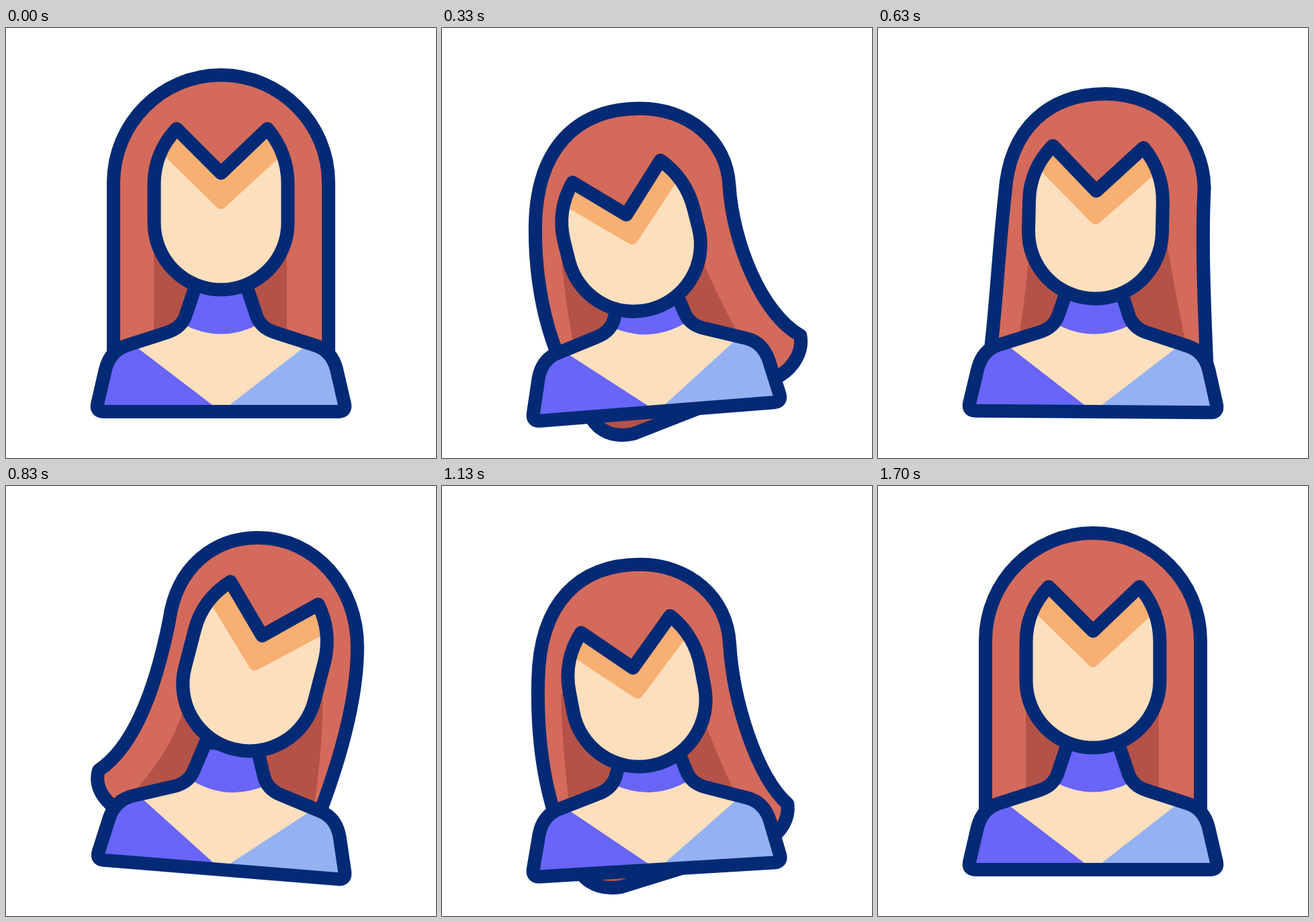
These frames come from a looping animation (640x640 px, 2 s). An HTML page with a canvas:

```html
<!DOCTYPE html>
<html lang="en">
<head>
<meta charset="utf-8">
<title>Portrait</title>
<style>
  html, body { margin: 0; height: 100%; overflow: hidden; background: #fff; }
  canvas { display: block; }
</style>
</head>
<body>
<canvas id="stage" width="640" height="640"></canvas>
<script>
const c = document.getElementById('stage').getContext('2d');
const NAVY = '#042a75', HAIR = '#d46a5b', SHADE = '#b55247', SKIN = '#fcdfbd',
      FRINGE = '#f7af72', VIOLET = '#6865f8', BLUE = '#94b1f2';

// Hair outline: left side, dome, right side, bottom; the last six points bound the shaded back
const points = s => s.split(' ').map(p => p.split(',').map(Number));
const hairRest = points(
  '160,490 160,410 160,320 160,230 160,142 232,70 320,70 408,70 480,142 480,230 ' +
  '480,320 480,410 480,490 480,530 460,555 430,555 210,555 180,555 160,530 ' +
  '220,300 220,420 220,560 418,560 418,420 418,300');
const hairLeft = points(
  '220,566 165,508 137,407 137,306 137,183 197,124 293,124 361,124 419,167 423,235 ' +
  '429,320 475,426 538,455 543,481 525,508 495,521 292,608 256,617 227,601 ' +
  '172,311 177,425 231,647 507,560 404,398 375,322');
const hairRight = points(
  '138,423 195,385 225,290 243,200 254,120 310,77 375,77 460,77 523,150 523,240 ' +
  '523,320 495,420 450,530 443,558 425,570 395,562 190,492 150,480 130,450 ' +
  '272,300 255,397 165,480 448,540 474,400 471,300');
const hairLeft2 = hairLeft.map(([x, y]) => [x - 12, y + (y > 400 ? 8 : 0)]);

// time, head tilt in degrees, nod in pixels, hair
const keys = [
  [0, 0, 0, hairRest],
  [400, -15.3, 61, hairLeft],
  [830, 14.5, -1, hairRight],
  [1230, -15.3, 61, hairLeft2],
  [1605, 0, 0, hairRest],
  [2000, 0, 0, hairRest]
];

const mix = (a, b, w) => a + (b - a) * w;

function poseAt(t) {
  const i = keys.findIndex((k, n) => n && t < k[0]);
  const [t0, a0, n0, h0] = keys[i - 1], [t1, a1, n1, h1] = keys[i];
  const u = (t - t0) / (t1 - t0), w = u * u * (3 - 2 * u);
  // the dome spreads a little as the head first passes upright
  const spread = i === 2 ? 0.2 * w * (1 - w) : 0;
  const hair = h0.map(([x, y], j) => {
    const px = mix(x, h1[j][0], w);
    return [px + (j < 10 ? (px - 335) * spread : 0), mix(y, h1[j][1], w)];
  });
  return { tilt: mix(a0, a1, w) * Math.PI / 180, nod: mix(n0, n1, w), hair };
}

function fill(path, color) {
  c.fillStyle = color;
  c.fill(path);
}

function turnAbout(x, y, angle) {
  c.translate(x, y);
  c.rotate(angle);
  c.translate(-x, -y);
}

// Fills an outline, paints details inside it, then strokes it
function part(outline, color, details) {
  fill(outline, color);
  c.save();
  c.clip(outline);
  details();
  c.restore();
  c.stroke(outline);
}

function drawHair(p) {
  const outline = new Path2D();
  const curve = (a, b, d) => outline.bezierCurveTo(...p[a], ...p[b], ...p[d]);
  outline.moveTo(...p[0]);
  for (let i = 1; i < 16; i += 3) {
    if (i < 15) curve(i, i + 1, i + 2);
  }
  outline.lineTo(...p[16]);
  curve(17, 18, 0);
  outline.closePath();

  const back = new Path2D();
  back.moveTo(...p[19]);
  back.quadraticCurveTo(...p[20], ...p[21]);
  back.lineTo(...p[22]);
  back.quadraticCurveTo(...p[23], ...p[24]);
  part(outline, HAIR, () => fill(back, SHADE));
}

const body = new Path2D(
  'M282 384L268 426Q262 446 240 453L178 473Q155 481 148 508L136 560Q134 571 145 571' +
  'H495Q506 571 504 560L492 508Q485 481 462 473L400 453Q378 446 372 426L358 384Z');
const collar = new Path2D('M262 370V440Q320 471 378 440V370Z');
const leftDress = new Path2D('M100 403L307 561V590H100Z');
const rightDress = new Path2D('M540 400L333 561V590H540Z');
const fringeShade = new Path2D('M225 180L313 266Q320 273 327 266L415 185L400 120H240Z');

function drawBody(tilt) {
  c.save();
  turnAbout(320, 571, tilt * 0.32);
  part(body, SKIN, () => {
    fill(collar, VIOLET);
    fill(leftDress, VIOLET);
    fill(rightDress, BLUE);
  });
  c.restore();
}

// The forehead sinks by the full nod, the jaw by half of it
function drawFace(tilt, nod) {
  c.save();
  turnAbout(320, 460, tilt);
  const face = new Path2D();
  face.moveTo(254, 150 + nod);
  face.lineTo(320, 216 + nod);
  face.lineTo(389, 150 + nod);
  face.bezierCurveTo(409, 173 + nod, 419.5, 202 + nod, 419.5, 232 + nod);
  face.arc(320, 290 + nod / 2, 99.5, 0, Math.PI);
  face.lineTo(220.5, 232 + nod);
  face.bezierCurveTo(220.5, 202 + nod, 232, 173 + nod, 254, 150 + nod);
  face.closePath();
  part(face, SKIN, () => {
    c.translate(0, nod * 0.86);
    fill(fringeShade, FRINGE);
  });
  c.restore();
}

function draw(now) {
  const { tilt, nod, hair } = poseAt(now % 2000);
  c.fillStyle = '#fff';
  c.fillRect(0, 0, 640, 640);
  c.strokeStyle = NAVY;
  c.lineWidth = 20;
  c.lineJoin = c.lineCap = 'round';
  drawHair(hair);
  drawBody(tilt);
  drawFace(tilt, nod);
}

const start = performance.now();
function loop() {
  draw(performance.now() - start);
  requestAnimationFrame(loop);
}
loop();
</script>
</body>
</html>
```
